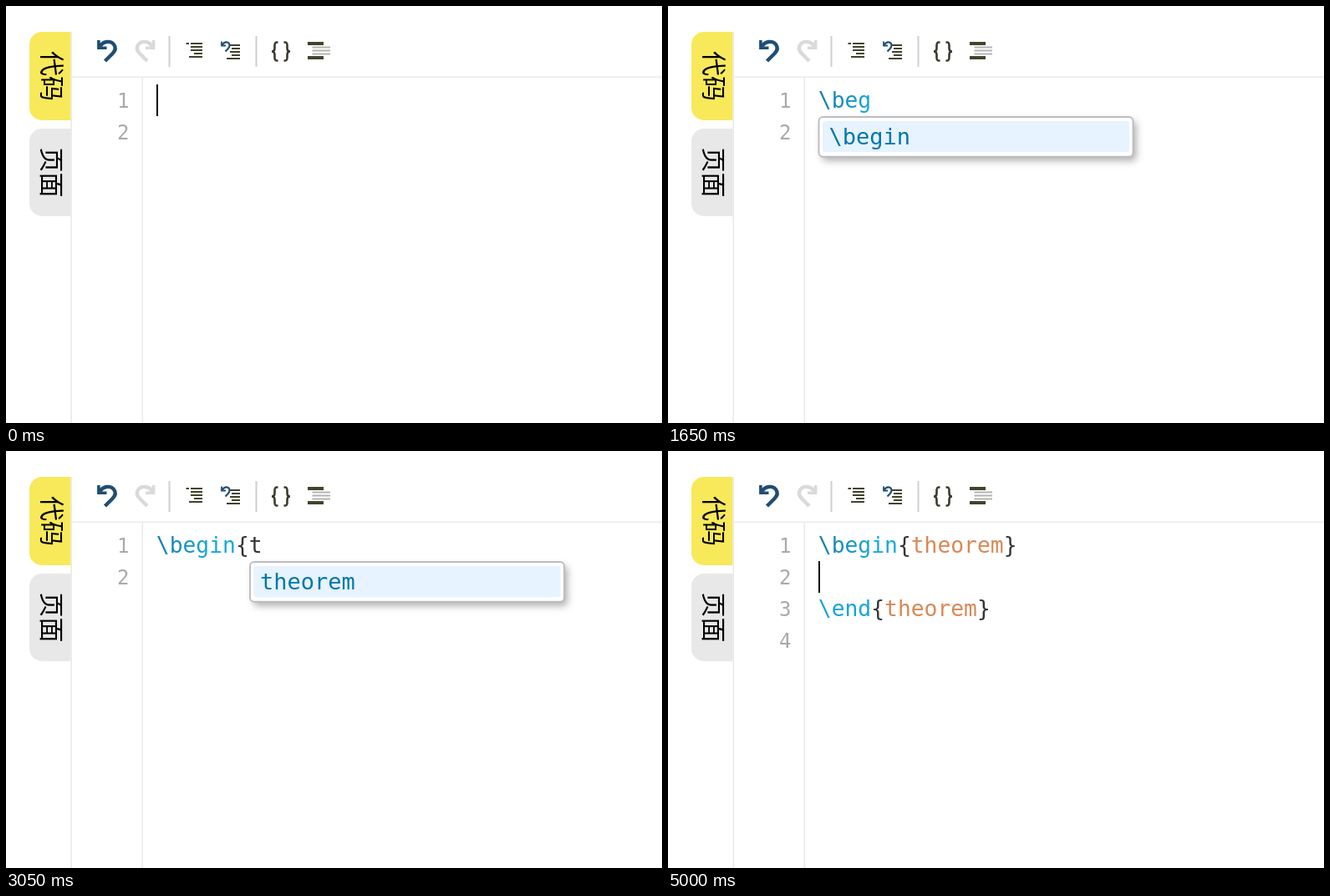
These frames come from a looping animation (785 px wide and 500 px high, 5.23 s). An HTML page with a canvas:

```html
<!DOCTYPE html>
<html lang="zh">
<head>
<meta charset="utf-8">
<title>Editor autocomplete</title>
<style>
html, body { margin: 0; width: 100%; height: 100%; overflow: hidden; background: #fff; }
canvas { display: block; }
</style>
</head>
<body>
<canvas id="stage" width="785" height="500"></canvas>
<script>
const ctx = document.getElementById("stage").getContext("2d");
const MONO = '"DejaVu Sans Mono", monospace';
const LOOP = 5230, CHAR = 15.85, LEFT = 179.8, LINE = 38, ROW = 37.75;
const DARK = "#333", CYAN = "#14a5d8", ORANGE = "#d98855";

const slashList = ["\\AA", "\\above", "\\abovewithdelims", "\\acute", "\\addtocounter",
  "\\adef", "\\ae", "\\AE", "\\aedef", "\\alef"];
const bList = ["\\backepsilon", "\\backprime", "\\backsim", "\\backsimeq", "\\backslash",
  "\\bar", "\\barwedge", "\\Bbb", "\\Bbbk", "\\bbox"];
const beList = ["\\because", "\\begin", "\\beta", "\\Beta", "\\beth", "\\between"];
const envList = ["align", "align*", "alignat", "alignat*", "aligned", "alignedat",
  "array", "bmatrix", "Bmatrix", "cases"];

// cmd/brace/name: parts of the first line; thumb: scrollbar thumb height; off: time the caret hides
const steps = [
  { at: 0, off: 170 },
  { at: 720, cmd: "\\", list: slashList, thumb: 32 },
  { at: 950, cmd: "\\b", list: bList, thumb: 90 },
  { at: 1100, cmd: "\\be", list: beList },
  { at: 1250, cmd: "\\beg", list: ["\\begin"], off: 1650 },
  { at: 2120, cmd: "\\begin", rest: "{", list: envList, thumb: 189, popAt: 292 },
  { at: 2520, cmd: "\\begin", rest: "{t", list: ["theorem"], popAt: 292, off: 3050 },
  { at: 3530, cmd: "\\begin", name: "theorem" },
  { at: 3930, cmd: "\\begin", name: "theorem", closed: true, off: 4540, on: 5000 }
];

function rect(x, y, w, h, color, radius = 0) {
  ctx.fillStyle = color;
  ctx.beginPath();
  ctx.roundRect(x, y, w, h, radius);
  ctx.fill();
}

function text(str, x, y, color, size) {
  ctx.font = `${size}px ${MONO}`;
  ctx.fillStyle = color;
  ctx.fillText(str, x, y);
}

function stroke(d, color, width) {
  ctx.strokeStyle = color;
  ctx.lineWidth = width;
  ctx.stroke(new Path2D(d));
}

// Draws the same thing mirrored about x = sum / 2
function mirrored(sum, draw) {
  ctx.save();
  ctx.translate(sum, 0);
  ctx.scale(-1, 1);
  draw();
  ctx.restore();
}

function tab(label, y, h, color) {
  rect(28, y, 49.5, h, color, [15, 0, 0, 15]);
  ctx.save();
  ctx.translate(55, y + h / 2);
  ctx.rotate(Math.PI / 2);
  ctx.font = '30px "Noto Sans CJK SC", "Noto Sans CJK", sans-serif';
  ctx.fillStyle = "#000";
  ctx.textAlign = "center";
  ctx.textBaseline = "middle";
  ctx.fillText(label, 0, 0);
  ctx.restore();
}

function undoArrow(color) {
  stroke("M110.9 41V50.3H120.5", color, 3.6);
  stroke("M112 49C116 42 125 41 129 46C132 50 130.500 54 127.500 57L118.500 66", color, 4.4);
}

function brace() {
  stroke("M325.500 43.500h-1c-2.500 0-3 1-3 4v3c0 3-1 4-3.500 4c2.500 0 3.500 1 3.500 4v3c0 3 .5 4 3 4h1", "#3c3a2c", 2.6);
}

function bars(starts, right, top, gap) {
  starts.forEach((x, i) => rect(x, top + i * gap, right - x, 2, "#43432d"));
}

function frame() {
  rect(0, 0, 785, 500, "#fff");
  tab("代码", 31, 106, "#f8e95a");
  tab("页面", 147, 105, "#e8e8e8");
  rect(77.5, 31, 1.5, 469, "#e9e9e9");
  rect(79, 84.5, 706, 1.5, "#ececec");
  rect(162.5, 86, 1.5, 414, "#e9e9e9");

  undoArrow("#1f4e74");
  mirrored(287.5, () => undoArrow("#dadada"));
  rect(194.5, 36, 2, 37, "#cfcfcf");
  rect(298.5, 36, 2, 37, "#cfcfcf");

  rect(215.5, 44, 3.5, 2, "#43432d");
  bars([221, 221, 221, 225, 219], 235, 44, 4);
  stroke("M258 42.500V47.500H263", "#1f4e74", 1.8);
  stroke("M258.500 47C261 42.500 265 42.500 267 45C268.500 48 267 50 262.500 54.500", "#1f4e74", 2.2);
  bars([268, 270, 268, 270, 264], 280, 46, 4);
  brace();
  mirrored(658, brace);
  rect(361, 43, 19, 4, "#43432d");
  rect(361, 60, 19, 4, "#43432d");
  for (let y = 48.5; y < 58; y += 4) rect(366.5, y, 21.5, 2, "#b3b3b3");
}

function popup({ list, thumb, popAt = 180.5 }) {
  const w = 376, y = 133, h = thumb ? 540 : list.length * ROW + 10;
  ctx.save();
  ctx.shadowColor = "rgba(0,0,0,.3)";
  ctx.shadowBlur = 8;
  ctx.shadowOffsetX = 4;
  ctx.shadowOffsetY = 5;
  rect(popAt, y, w, h, "#fff", 5);
  ctx.restore();
  if (thumb) {
    rect(popAt + 343.5, y + 1, 31.5, h, "#f1f1f1", [0, 4, 0, 0]);
    rect(popAt + 346.5, 166, 25, thumb, "#c1c1c1");
    ctx.fillStyle = "#a3a3a3";
    ctx.fill(new Path2D(`M${popAt + 353} 154l6-7l6 7z`));
  }
  ctx.strokeStyle = "#bdbdbd";
  ctx.lineWidth = 1.9;
  ctx.beginPath();
  ctx.roundRect(popAt, y, w, h, 5);
  ctx.stroke();
  rect(popAt + 4.5, 138, thumb ? 335 : 367, 37.3, "#e7f3fe", 3);
  list.forEach((item, i) => text(item, popAt + 12, 166.3 + i * ROW, i ? DARK : "#0077aa", 27));
}

// Writes coloured pieces on one editor line and returns its length in characters
function codeLine(row, pieces) {
  let n = 0;
  for (const [str, color] of pieces) {
    text(str, LEFT + n * CHAR, 122 + row * LINE, color, CHAR / 0.60205);
    n += str.length;
  }
  return n;
}

const cmdFade = ctx.createLinearGradient(180, 0, 245, 0);
cmdFade.addColorStop(0, "#147ba8");
cmdFade.addColorStop(1, "#17a9db");

function draw(now) {
  const t = now % LOOP;
  const s = steps.findLast(step => step.at <= t);
  frame();

  ctx.textAlign = "right";
  for (let i = 0; i < (s.closed ? 4 : 2); i++) text(i + 1, 147.5, 122 + i * LINE, "#aaa", 24);
  ctx.textAlign = "left";

  const named = s.name ? [["{", DARK], [s.name, ORANGE], ["}", DARK]] : [[s.rest || "", DARK]];
  let col = codeLine(0, [[s.cmd || "", cmdFade], ...named]), row = 0;
  if (s.closed) {
    codeLine(2, [["\\end", CYAN], ...named]);
    col = 0;
    row = 1;
  }
  if (s.list) popup(s);
  if (!(t >= s.off) || t >= s.on) rect(Math.round(179.6 + col * CHAR), 94 + row * LINE, 2, LINE, "#000");
  requestAnimationFrame(() => draw(performance.now()));
}
draw(0);
</script>
</body>
</html>
```
